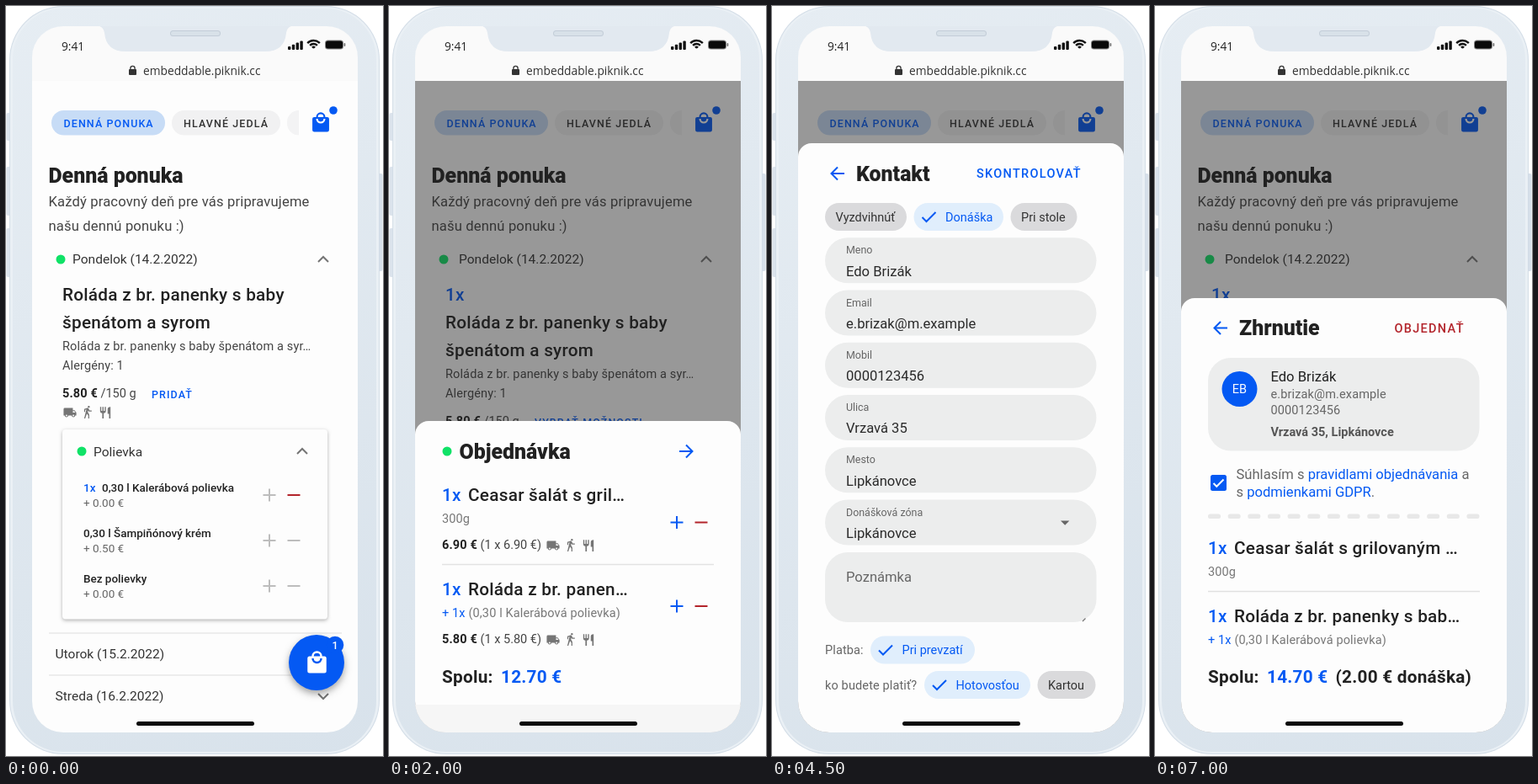
Animation of 448x891 px, one loop 8000 ms. Source, as an HTML page with a canvas:

```html
<!DOCTYPE html>
<html lang="sk">
<head>
<meta charset="utf-8">
<title>Objednávka jedla</title>
<style>
html, body { margin: 0; width: 100%; height: 100%; overflow: hidden; background: #fff; }
canvas { display: block; width: 448px; height: 891px; }
</style>
</head>
<body>
<canvas id="stage"></canvas>
<script>
const W = 448, H = 891, LOOP = 8000;
const BLUE = '#0459f3', RED = '#b3242b', INK = '#212121', SOFT = '#666', GREEN = '#10e267';
const PERSON = { name: 'Edo Brizák', initials: 'EB', mail: 'e.brizak@m.example', phone: '0000123456', street: 'Vrzavá 35', town: 'Lipkánovce' };

// Type sizes, enlarged with the mock-up
const [H5, H6, BODY, PANEL, SMALL, LIST, TINY] = [24, 20, 16, 15, 14, 13, 12].map(px => px * 1.037);

const ICONS = {
  bag: 'M12 13A5 5 0 0 1 7 8H9A3 3 0 0 0 15 8H17A5 5 0 0 1 12 13M12 3A3 3 0 0 1 15 6H9A3 3 0 0 1 12 3M19 6H17A5 5 0 0 0 7 6H5Q3 6 3 8V20A2 2 0 0 0 5 22H19A2 2 0 0 0 21 20V8Q21 6 19 6Z',
  truck: 'M20 8L23 12V17H21A3 3 0 0 1 15 17H9A3 3 0 0 1 3 17H1V6Q1 4 3 4H17V8ZM17 9.5V12H21.5L19.5 9.5ZM16.5 17a1.5 1.5 0 1 0 3 0a1.5 1.5 0 1 0 -3 0ZM4.5 17a1.5 1.5 0 1 0 3 0a1.5 1.5 0 1 0 -3 0Z',
  walk: 'M14.1 10H19V8.2H15.4L13.4 4.9Q12.7 3.7 11.4 4.1L6 5.8V11H7.8V7.3L9.9 6.7L6 22H7.8L10.7 13.9L13 17V22H14.8V15.6L12.3 11L13 8.2ZM12.2 2a1.8 1.8 0 1 0 3.6 0a1.8 1.8 0 1 0 -3.6 0Z',
  cutlery: 'M11 9H9V2H7V9H5V2H3V9A4 4 0 0 0 6.75 13V22H9.25V13A4 4 0 0 0 13 9V2H11ZM16 6V14H18.5V22H21V2Q16 2 16 6Z'
};
for (const key in ICONS) ICONS[key] = new Path2D(ICONS[key]);

const canvas = document.getElementById('stage');
const ctx = canvas.getContext('2d');
const dpr = window.devicePixelRatio || 1;
canvas.width = W * dpr;
canvas.height = H * dpr;

function text(str, x, y, size, { color = INK, weight = 400, spacing = 0, family = 'Roboto', align = 'left' } = {}) {
  ctx.font = `${weight} ${size}px ${family}, sans-serif`;
  ctx.letterSpacing = spacing * size + 'px';
  ctx.textAlign = align;
  ctx.fillStyle = color;
  ctx.fillText(str, x, y);
  return x + ctx.measureText(str).width;
}
const title = (s, x, y) => text(s, x, y, H5, { weight: 800 });
const heading = (s, x, y, color) => text(s, x, y, H6, { weight: 500, spacing: .0125, color });
const total = (s, x, y, color) => text(s, x, y, H6, { weight: 700, spacing: .0125, color });
const small = (s, x, y, color) => text(s, x, y, SMALL, { spacing: .009, color });
const button = (s, x, y, size, color = BLUE) => text(s, x, y, size, { weight: 500, spacing: .0893, color });

function box(x, y, w, h, r, color) {
  ctx.beginPath();
  ctx.roundRect(x, y, w, h, r);
  ctx.fillStyle = color;
  ctx.fill();
}
function dot(x, y, r, color) {
  ctx.beginPath();
  ctx.arc(x, y, r, 0, 7);
  ctx.fillStyle = color;
  ctx.fill();
}
function line(points, color, width = 2) {
  ctx.beginPath();
  points.forEach(([x, y]) => ctx.lineTo(x, y));
  ctx.strokeStyle = color;
  ctx.lineWidth = width;
  ctx.stroke();
}
function icon(name, cx, cy, size, color) {
  ctx.save();
  ctx.translate(cx - size / 2, cy - size / 2);
  ctx.scale(size / 24, size / 24);
  ctx.fillStyle = color;
  ctx.fill(ICONS[name], 'evenodd');
  ctx.restore();
}
const chevron = (x, y, dir) => line([[x - 6, y + 3 * dir], [x, y - 3 * dir], [x + 6, y + 3 * dir]], '#757575');
const check = (x, y, color, s = 1) => line([[x - 8 * s, y], [x - 3 * s, y + 5 * s], [x + 8 * s, y - 6 * s]], color);
const minus = (x, y, color) => line([[x - 7.5, y], [x + 7.5, y]], color);
function plus(x, y, color) {
  minus(x, y, color);
  line([[x, y - 7.5], [x, y + 7.5]], color);
}
function arrow(x, y, dir) {
  line([[x - 8 * dir, y], [x + 7 * dir, y]], BLUE);
  line([[x, y - 7.5], [x + 7.5 * dir, y], [x, y + 7.5]], BLUE);
}
function services(x, y) {
  ['truck', 'walk', 'cutlery'].forEach((name, i) => icon(name, x + i * 21, y, 16.5, '#757575'));
}
function price(x, y, value, rest) {
  const end = text(value, x, y, SMALL, { weight: 700, spacing: .009 });
  return text(' ' + rest, end, y, SMALL, { color: '#444' });
}
function chip(x, y, w, label, selected) {
  box(x, y, w, 33, 16.5, selected ? '#e0eefc' : '#dadadc');
  if (selected) check(x + 18, y + 17, BLUE);
  text(label, x + (selected ? 37.5 : 12.5), y + 21.7, SMALL, { color: selected ? BLUE : '#333' });
}

function phoneBody() {
  ctx.fillStyle = '#fff';
  ctx.fillRect(0, 0, W, H);
  [[127, 33], [191, 58], [264, 58]].forEach(([y, h]) => box(.5, y, 6, h, 2, '#dbe3ec'));
  box(441, 199, 6.5, 116, 2, '#d6dfe9');
  const shell = ctx.createLinearGradient(0, 0, W, H);
  shell.addColorStop(0, '#e6edf3');
  shell.addColorStop(1, '#d8e2eb');
  box(4, 0, 440, 889, 64, '#d3dde7');
  box(5, 1, 438, 887, 63, '#eaf0f5');
  box(8, 3, 432, 883, 60, shell);
}

function clipScreen() {
  ctx.beginPath();
  ctx.roundRect(31, 24, 387, 839, 37);
  ctx.clip();
}

function phoneTop() {
  ctx.fillStyle = '#fafafa';
  ctx.fillRect(31, 24, 387, 65);
  ctx.fillStyle = '#e2e9f0';
  ctx.beginPath();
  ctx.moveTo(107, 23);
  ctx.quadraticCurveTo(116, 24, 117, 32);
  ctx.quadraticCurveTo(119, 54, 142, 54);
  ctx.lineTo(308, 54);
  ctx.quadraticCurveTo(331, 54, 333, 32);
  ctx.quadraticCurveTo(334, 24, 343, 23);
  ctx.fill();
  box(195, 29, 60, 7, 3.5, '#c3cdd8');
  box(196, 30, 58, 5, 2.5, '#d8e1e9');

  const sans = { family: 'Open Sans', color: '#222' };
  text('9:41', 66, 52.5, 13.7, sans);
  text('embeddable.piknik.cc', 163, 82, 13.75, { ...sans, color: '#333' });
  for (let i = 0; i < 4; i++) box(335 + i * 4.8, 48 - i * 2.2, 3.4, 4 + i * 2.2, 1, '#111');
  [[10, 2.4], [6, 2.4], [2, 2.6]].forEach(([r, w]) => {
    ctx.beginPath();
    ctx.arc(365.5, 51, r, -Math.PI * .76, -Math.PI * .24);
    ctx.strokeStyle = '#111';
    ctx.lineWidth = w;
    ctx.stroke();
  });
  box(379, 40.5, 22, 11, 3.5, '#888');
  box(380, 41.5, 20, 9, 2.5, '#0a0a0a');
  box(401.5, 44, 1.8, 4, 1, '#777');

  box(146, 75, 9, 7, 1, '#333');
  ctx.beginPath();
  ctx.arc(150.5, 74, 2.6, Math.PI, 0);
  ctx.lineTo(153.1, 76);
  ctx.moveTo(147.9, 74);
  ctx.lineTo(147.9, 76);
  ctx.strokeStyle = '#333';
  ctx.lineWidth = 1.3;
  ctx.stroke();
}

function meal(y) {
  heading('Roláda z br. panenky s baby', 67, y);
  heading('špenátom a syrom', 67, y + 33);
  small('Roláda z br. panenky s baby špenátom a syr…', 67, y + 59, '#444');
  small('Alergény: 1', 67, y + 81.5, '#444');
  price(67, y + 115, '5.80 €', '/150 g');
}

function soupCard() {
  ctx.save();
  ctx.shadowColor = 'rgba(0,0,0,.3)';
  ctx.shadowBlur = 4;
  ctx.shadowOffsetY = 1.5;
  box(67, 503, 315, 225.5, 4, '#fdfdfd');
  ctx.restore();
  dot(90, 529, 5.5, GREEN);
  text('Polievka', 104, 534.5, PANEL, { color: '#333' });
  chevron(352, 529, 1);
  const soups = [['0,30 l Kalerábová polievka', '+ 0.00 €'], ['0,30 l Šampiňónový krém', '+ 0.50 €'], ['Bez polievky', '+ 0.00 €']];
  soups.forEach(([name, extra], i) => {
    const y = 576.5 + i * 54;
    if (!i) text('1x', 92, y, LIST, { weight: 500, color: BLUE });
    text(name, i ? 92 : 114, y, LIST, { weight: 500 });
    text(extra, 92, y + 18.5, LIST, { color: SOFT });
    plus(313, y + 4.5, '#bdbdbd');
    minus(342, y + 4.5, i ? '#bdbdbd' : RED);
  });
}

function menu(ordered) {
  ctx.fillStyle = '#fdfdfd';
  ctx.fillRect(31, 88, 387, 775);
  box(54, 124, 135, 29.5, 14.75, '#c7dcf6');
  button('DENNÁ PONUKA', 68.5, 143.5, TINY);
  box(197, 124, 129, 29.5, 14.75, '#f1f1f2');
  button('HLAVNÉ JEDLÁ', 211, 143.5, TINY, '#333');
  box(334, 124, 14, 29.5, [14, 0, 0, 14], '#f3f3f4');
  icon('bag', 374, 138.5, 26.5, BLUE);
  dot(389, 124, 4.8, BLUE);

  title('Denná ponuka', 50.5, 210);
  const intro = { spacing: .0094, color: '#444' };
  text('Každý pracovný deň pre vás pripravujeme', 50.5, 238, BODY, intro);
  text('našu dennú ponuku :)', 50.5, 267, BODY, intro);
  dot(65, 301, 5.5, GREEN);
  text('Pondelok (14.2.2022)', ordered ? 83 : 79, 306, PANEL, { color: '#333' });
  chevron(377, 301, 1);

  if (ordered) {
    heading('1x', 67, 350, BLUE);
    meal(383);
    button('VYBRAŤ MOŽNOSTI', 173, 499, TINY);
    return;
  }
  meal(350);
  button('PRIDAŤ', 173, 465.5, TINY);
  services(76, 483);
  soupCard();
  line([[51, 745], [399, 745]], '#dedede', 1.2);
  line([[51, 795], [399, 795]], '#dedede', 1.2);
  text('Utorok (15.2.2022)', 58.5, 775, PANEL, { color: '#333' });
  text('Streda (16.2.2022)', 58.5, 825, PANEL, { color: '#333' });
  chevron(377, 820, -1);

  ctx.save();
  ctx.shadowColor = 'rgba(0,0,0,.35)';
  ctx.shadowBlur = 9;
  ctx.shadowOffsetY = 4;
  dot(369, 780, 33, BLUE);
  ctx.restore();
  icon('bag', 369.5, 780, 30, '#fff');
  dot(391, 759, 10.3, BLUE);
  text('1', 391, 763.5, TINY, { color: '#fff', weight: 500, align: 'center' });
}

function sheet(top) {
  ctx.fillStyle = 'rgba(33,33,33,.46)';
  ctx.fillRect(31, 89, 387, 775);
  box(31, top, 387, 900 - top, [16, 16, 0, 0], '#fdfdfd');
}

function orderLine(y, name, detail) {
  heading('1x', 63, y, BLUE);
  heading(name, 94, y);
  if (detail) return small(detail, 63, y + 25.5, '#777');
  small('+ 1x', 63, y + 25.5, BLUE);
  small('(0,30 l Kalerábová polievka)', 94.5, y + 25.5, '#777');
}

function listScene() { menu(false); }

function basketScene() {
  menu(true);
  sheet(493);
  ctx.fillStyle = '#f6f6f6';
  ctx.fillRect(31, 830, 387, 33);
  dot(69, 529, 5.5, GREEN);
  title('Objednávka', 83.5, 538);
  arrow(353, 529, 1);
  orderLine(588, 'Ceasar šalát s gril…', '300g');
  price(63, 645, '6.90 €', '(1 x 6.90 €)');
  services(195, 641);
  line([[63, 663.5], [386, 663.5]], '#e3e3e3', 1.6);
  orderLine(700, 'Roláda z br. panen…');
  price(63, 757, '5.80 €', '(1 x 5.80 €)');
  services(195, 753);
  [613.5, 713].forEach(y => {
    plus(342, y, BLUE);
    minus(371, y, RED);
  });
  total('Spolu:', 63, 804);
  total('12.70 €', 133, 804, BLUE);
}

function contactScene() {
  menu(true);
  sheet(163);
  arrow(78, 199, -1);
  title('Kontakt', 100, 207.5);
  button('SKONTROLOVAŤ', 243, 204, SMALL);
  chip(63, 234, 97, 'Vyzdvihnúť');
  chip(168.5, 234, 106.5, 'Donáška', true);
  chip(283.5, 234, 79, 'Pri stole');
  const fields = [['Meno', PERSON.name], ['Email', PERSON.mail], ['Mobil', PERSON.phone],
    ['Ulica', PERSON.street], ['Mesto', PERSON.town], ['Donášková zóna', PERSON.town]];
  fields.forEach(([label, value], i) => {
    const y = 275.3 + i * 62.25;
    box(63, y, 322.5, 54, 27, '#eceded');
    text(label, 88, y + 19, TINY, { color: SOFT });
    text(value, 88, y + 45.3, BODY, { color: '#2a2a2a' });
  });
  ctx.fillStyle = '#666';
  ctx.fill(new Path2D('M343 611.5h10.4l-5.2 5.2z'));
  box(63, 649, 322.5, 83, 27, '#eceded');
  text('Poznámka', 88, 684, BODY, { color: SOFT });
  line([[369, 731], [372.5, 727.5]], '#777', 1.2);
  small('Platba:', 63, 770, SOFT);
  chip(117, 748.5, 124, 'Pri prevzatí', true);
  small('ko budete platiť?', 63, 811.5, SOFT);
  chip(181, 790, 126, 'Hotovosťou', true);
  chip(315.5, 790, 69, 'Kartou');
}

function summaryScene() {
  menu(true);
  sheet(347);
  arrow(78, 382.5, -1);
  title('Zhrnutie', 100, 391);
  button('OBJEDNAŤ', 284.5, 387.5, SMALL, RED);
  box(63, 418, 322.5, 110.5, 27, '#eceded');
  dot(100.5, 455, 21, BLUE);
  text(PERSON.initials, 100.5, 460, SMALL, { color: '#fff', align: 'center' });
  text(PERSON.name, 137.5, 445.5, BODY);
  small(PERSON.mail, 137.5, 465.5, SOFT);
  small(PERSON.phone, 137.5, 485, SOFT);
  text(`${PERSON.street}, ${PERSON.town}`, 137.5, 510.5, SMALL, { weight: 700, color: '#555' });

  box(66, 557, 19, 19, 2.5, BLUE);
  check(75.5, 567, '#fff', .75);
  const runs = (y, ...parts) => parts.reduce((x, [s, color]) => text(s, x, y, BODY, { color }), 96.5);
  runs(562, ['Súhlasím s ', SOFT], ['pravidlami objednávania', BLUE], [' a', SOFT]);
  runs(582.5, ['s ', SOFT], ['podmienkami GDPR', BLUE], ['.', SOFT]);
  for (let i = 0; i < 14; i++) box(63 + i * 23.65, 603.5, 15, 5.5, 2.5, '#e8e8e8');

  orderLine(651, 'Ceasar šalát s grilovaným …', '300g');
  line([[63, 695.5], [386, 695.5]], '#e0e0e0', 1.5);
  orderLine(732, 'Roláda z br. panenky s bab…');
  total('Spolu:', 63, 804);
  total('14.70 €', 133, 804, BLUE);
  total('(2.00 € donáška)', 214.5, 804);
}

const SCENES = [[0, listScene], [500, basketScene], [3000, contactScene], [5500, summaryScene]];

function render(time) {
  ctx.setTransform(dpr, 0, 0, dpr, 0, 0);
  phoneBody();
  ctx.save();
  clipScreen();
  SCENES.findLast(([start]) => time >= start)[1]();
  phoneTop();
  box(155, 850, 140, 5, 2.5, '#0a0a0a');
  ctx.restore();
}

let startTime;
function tick(now) {
  startTime ??= now;
  render((now - startTime) % LOOP);
  requestAnimationFrame(tick);
}
render(0);
requestAnimationFrame(tick);
</script>
</body>
</html>
```
